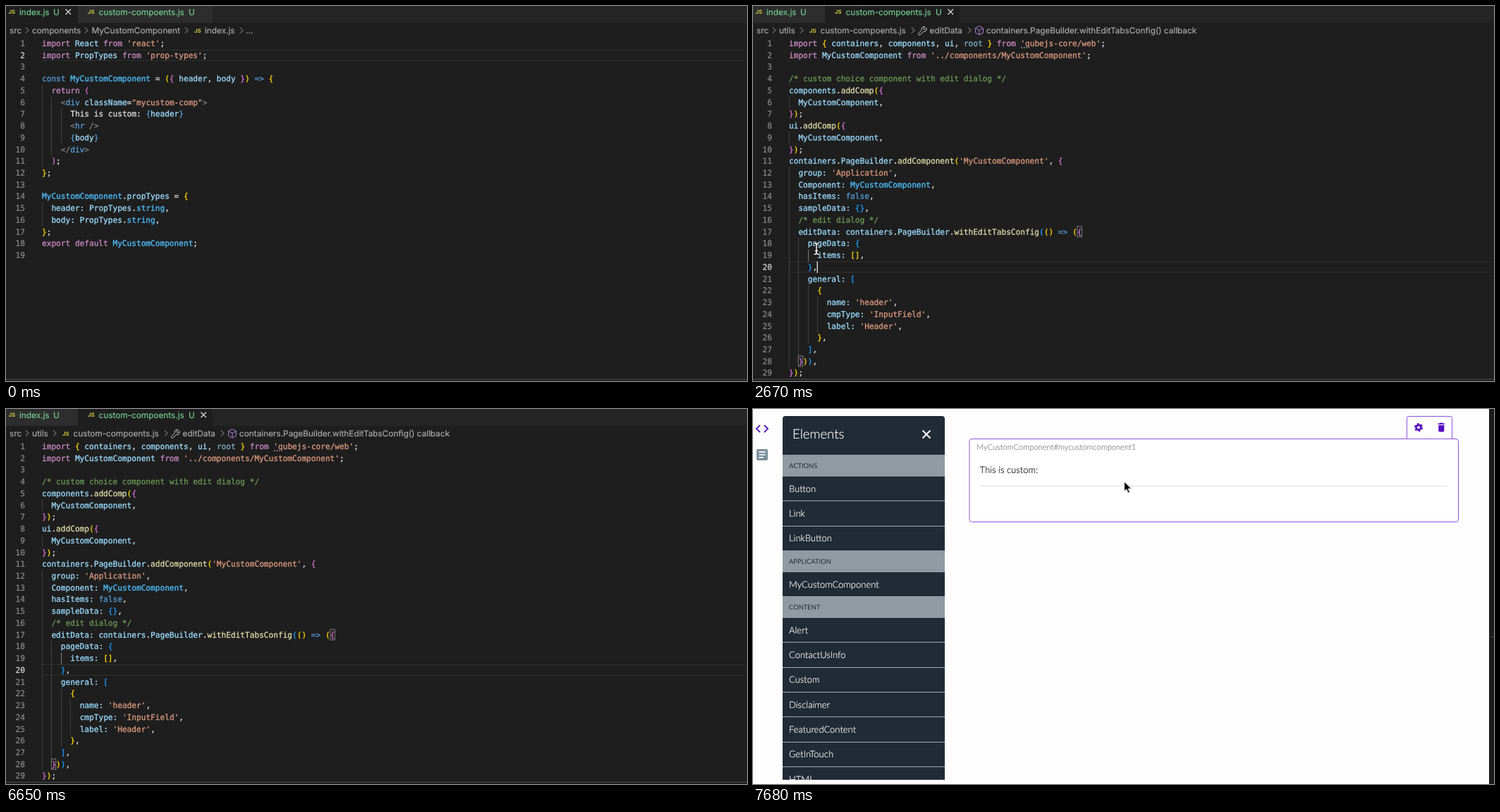
An HTML page that plays this animation: 1051 px wide and 533 px high, repeating every 8000 ms.

```html
<!DOCTYPE html>
<html lang="en">
<head>
<meta charset="utf-8">
<title>Custom component demo</title>
<style>
html, body { margin: 0; width: 100%; height: 100%; overflow: hidden; background: #1e1e1e; }
svg { display: block; width: 1051px; height: 533px; }
text, tspan { fill: currentColor; stroke: currentColor; }
text { text-rendering: geometricPrecision; stroke-width: .2; }
.code text { font: 11.14px "DejaVu Sans Mono", monospace; stroke-width: .3; color: #858585; }
.code .active { color: #d0d0d0; }
.ui text { font: 11.8px Inter, sans-serif; color: #a9a9a9; }
.ui .tab { color: #73c991; }
.ui .js { font-size: 7.8px; font-weight: 700; color: #cbcb41; stroke: none; }
.line { fill: none; stroke: #a9a9a9; }
.page text { font: 300 13px Lato, sans-serif; color: #fff; }
.page .head { font-size: 9.4px; font-weight: 400; color: #222b36; stroke: none; }
.page .title { font-size: 18.6px; }
.page .dark { color: #1c1c1c; }
.page .tag { font-size: 11.15px; color: #85858c; }

.anim { animation: 8s step-end infinite; }
#first { animation-name: first; }
#second { animation-name: second; }
#page { animation-name: page; }
#drag { animation-name: drag; }
#drop { animation-name: drop; }
#caret { animation-name: caret; }
#cursor { animation-name: move; }
#beam { animation-name: beam; }
#hand { animation-name: hand; }
#arrow { animation-name: page; }

@keyframes first { 0% { opacity: 1 } 18.625%, 100% { opacity: 0 } }
@keyframes second { 0% { opacity: 0 } 18.625% { opacity: 1 } 84.75%, 100% { opacity: 0 } }
@keyframes page { 0% { opacity: 0 } 84.75%, 100% { opacity: 1 } }
@keyframes drag { 0% { opacity: 1 } 86.625%, 100% { opacity: 0 } }
@keyframes drop { 0% { opacity: 0 } 86.625%, 100% { opacity: 1 } }
@keyframes caret {
  0%, 31.5%, 44.5%, 57.375%, 70.375%, 81.5% { opacity: 1 }
  26%, 38.875%, 51.875%, 62.875%, 76%, 83.125%, 100% { opacity: 0 }
}
@keyframes beam { 0%, 26% { opacity: 1 } 15%, 84.75%, 100% { opacity: 0 } }
@keyframes hand { 0%, 26%, 100% { opacity: 0 } 15% { opacity: 1 } }
@keyframes move {
  0%, 57.375% { transform: translate(-60px, -60px) }
  3.75% { transform: translate(377px, 494px) }
  5.625% { transform: translate(335px, 375px) }
  7.5% { transform: translate(268px, 190px) }
  9.375% { transform: translate(227px, 78px) }
  13.125% { transform: translate(212px, 46px) }
  15% { transform: translate(196px, 14px) }
  16.875%, 18.625%, 20.5% { transform: translate(192px, 11.5px) }
  24.125% { transform: translate(189px, 15px) }
  26% { transform: translate(158px, 80px) }
  27.875% { transform: translate(112px, 185px) }
  29.75% { transform: translate(84px, 265px) }
  31.5% { transform: translate(77px, 318px) }
  33.375% { transform: translate(90px, 345px) }
  35.25% { transform: translate(124px, 357px) }
  37.125% { transform: translate(166px, 362px) }
  38.875% { transform: translate(188px, 372px) }
  40.75% { transform: translate(199px, 380px) }
  48.25% { transform: translate(218px, 380.5px) }
  50% { transform: translate(296px, 405px) }
  51.875% { transform: translate(430px, 445px) }
  53.75% { transform: translate(580px, 488px) }
  55.625% { transform: translate(690px, 518px) }
  84.75% { transform: translate(498.5px, 86px) }
  90.375% { transform: translate(509px, 92px) }
  92.25% { transform: translate(523px, 101px) }
  94.125% { transform: translate(529.5px, 104.5px) }
  96%, 100% { transform: translate(526.5px, 103px) }
}
</style>
</head>
<body>
<svg viewBox="0 0 1051 533">
  <rect width="1051" height="533" fill="#1e1e1e"/>
  <g id="first" class="anim"></g>
  <g id="second" class="anim"></g>

  <g id="page" class="anim page">
    <rect width="1051" height="533" fill="#fdfdfd"/>
    <path fill="#1b1b1b" d="M1044 0h7v533h-7z"/>
    <path fill="#383838" d="M1044 323h7v1h-7z"/>
    <path fill="none" stroke="#5a1fc0" stroke-width="2" d="M10 23l-5 5 5 5M16 23l5 5-5 5"/>
    <rect x="5" y="57" width="16" height="16" rx="2" fill="#7d919c"/>
    <path stroke="#fff" stroke-width="1.7" d="M8.5 61.2h9M8.5 65h9M8.5 68.8h6"/>
    <path fill="#202b36" d="M42 527V14a4 4 0 0 1 4-4h222a4 4 0 0 1 4 4v513z"/>
    <text class="title" x="56" y="42">Elements</text>
    <path stroke="#fff" stroke-width="2" d="M240.5 30.5l11 11m0-11l-11 11"/>
    <clipPath id="panel"><path d="M42 10h230v517H42z"/></clipPath>
    <g id="list" clip-path="url(#panel)"></g>

    <g id="drag" class="anim">
      <rect x="307.5" y="43" width="692.5" height="80" rx="3.5" fill="#e8f0ea" stroke="#6cc66c" stroke-width="2"/>
      <path fill="none" stroke="#3d35a0" stroke-width="1.7" d="M643.5 73.5h20M653.5 63.5v20M650 66.5l3.5-3.5 3.5 3.5M650 80.5l3.5 3.5 3.5-3.5M646.5 70l-3.5 3.5 3.5 3.5M660.5 70l3.5 3.5-3.5 3.5"/>
      <text class="dark" x="588" y="100.5">Release to drop for root</text>
      <path fill="#038de0" d="M42 232h230v34H42z"/>
      <text x="51" y="254">MyCustomComponent</text>
      <g opacity=".9" style="filter: drop-shadow(0 3px 6px #0007)">
        <path fill="#202b36" d="M377.5 77h230.5v34.5h-230.5z"/>
        <text x="387" y="99.5">MyCustomComponent</text>
      </g>
    </g>

    <g id="drop" class="anim">
      <path fill="#fff" stroke="#8d55e0" d="M927.5 42.5v-30a2 2 0 0 1 2-2h60a2 2 0 0 1 2 2v30z"/>
      <rect x="307" y="42.5" width="693.5" height="118" rx="3.5" fill="#fff" stroke="#8d55e0"/>
      <g fill="none" stroke="#560cc0">
        <circle cx="944" cy="26.2" r="3.4" stroke-width="2.7"/>
        <circle cx="944" cy="26.2" r="5.2" stroke-width="1.8" stroke-dasharray="2.7 2.745"/>
      </g>
      <path fill="#560cc0" d="M971.5 20.5h2.5l1-1h2.5l1 1h2.5v1.5h-9.5zM972.3 23h8v8a1.4 1.4 0 0 1-1.4 1.4h-5.2a1.4 1.4 0 0 1-1.4-1.4z"/>
      <text class="tag" x="317" y="57.5">MyCustomComponent#mycustomcomponent1</text>
      <text class="dark" x="321.5" y="91">This is custom:</text>
      <path stroke="#dedede" d="M321.5 109.5h664"/>
    </g>
  </g>

  <g id="cursor" class="anim">
    <g id="beam" class="anim" fill="none">
      <path id="bar" d="M-3.5-8q3.5 0 3.5 2.5V5.5Q0 8-3.5 8M3.5-8Q0-8 0-5.5V5.5Q0 8 3.5 8M-2 3h4" stroke="#111" stroke-width="3.2"/>
      <path d="M-3.5-8q3.5 0 3.5 2.5V5.5Q0 8-3.5 8M3.5-8Q0-8 0-5.5V5.5Q0 8 3.5 8M-2 3h4" stroke="#fff" stroke-width="1.5"/>
    </g>
    <path id="hand" class="anim" fill="#fff" stroke="#111" stroke-width=".9" d="M-1.2 1.2q0-1.2 1.2-1.2t1.3 1.2l.6 3.6q2-1 2.5.6 1.7-.8 2.2.7 1.7-.4 1.7 1.2l-.3 3-1.5 2.8v1.4H.5L-1.5 11l-3-3.4q-.6-1.5 1-1.4L-.6 8z"/>
    <path id="arrow" class="anim" stroke="#fff" d="M0 0v14.2l3.2-3 2.3 5.3 2.5-1.1-2.3-5.1h4.6z"/>
  </g>
</svg>

<script>
const colors = {
  p: '#cb8ac6', v: '#9cdcfe', w: '#dedede', s: '#dc9a7f', b: '#569cd6', c: '#4fc1ff', y: '#ffd700',
  m: '#da70d6', u: '#179fff', f: '#dcdcaa', g: '#6a9955', d: '#808080', r: '#7badc6'
};
const rowH = 16.73, charW = 6.707, left = 51, top0 = 45;
const $ = id => document.getElementById(id);
const text = (x, y, s, cls = '') => `<text class="${cls}" x="${x}" y="${y}">${s}</text>`;
const rect = (x, y, w, h, fill) => `<rect x="${x}" y="${y}" width="${w}" height="${h}" fill="${fill}"/>`;
const rowTop = n => top0 + (n - 1) * rowH;
const cross = x => `<path class="line" style="stroke:#ddd;stroke-width:1.2" d="M${x} 4.5l7.5 7.5m0-7.5l-7.5 7.5"/>`;

// "~x" switches to colour x
function codeLine(src, n) {
  const [indent, ...parts] = src.split('~');
  const spans = parts.map(p =>
    `<tspan color="${colors[p[0]]}">${p.slice(1).replace(/</g, '&lt;')}</tspan>`).join('');
  return text(left + indent.length * charW, rowTop(n) + 12, spans);
}

function code(src, active, guides) {
  const y = Math.round(rowTop(active));
  let out = [y, y + 15].map(edge => rect(left, edge, 997, 1, '#303030')).join('');
  for (const [level, from, to, color = '#404040'] of guides)
    out += rect(Math.round(left + level * 2 * charW), rowTop(from), 1, (to - from + 1) * rowH, color);
  src.split('\n').forEach((line, i) => {
    const n = i + 1;
    out += `<text class="${n === active ? 'active' : ''}" x="27" y="${rowTop(n) + 12}" text-anchor="end">${n}</text>`;
    out += codeLine(line, n);
  });
  return `<g class="code">${out}</g>`;
}

function chrome(activeTab, crumbs, chevrons) {
  const tabs = [[0, 102], [102, 191]];
  const fill = i => i === activeTab ? '#1e1e1e' : '#2d2d2d';
  return '<g class="ui">' + rect(0, 0, 1051, 24, '#252526') +
    tabs.map(([x, w], i) => rect(x, 0, w, 24, fill(i))).join('') +
    text(3.5, 11, 'JS', 'js') + text(19, 12.5, 'index.js', 'tab') + text(67, 12.5, 'U', 'tab') +
    text(116, 11, 'JS', 'js') + text(131.5, 12.5, 'custom-compoents.js', 'tab') + text(259, 12.5, 'U', 'tab') +
    cross(activeTab ? 276.5 : 84.5) +
    crumbs.map(([x, s]) => s === 'JS' ? text(x, 37.5, s, 'js') : text(x, 39, s)).join('') +
    chevrons.map(x => `<path class="line" d="M${x} 30.5l4 4-4 4"/>`).join('') +
    rect(0, 530, 1051, 1, '#4c4c4c') + '</g>';
}

$('first').innerHTML = chrome(0,
  [[5, 'src'], [37, 'components'], [121.5, 'MyCustomComponent'], [267, 'JS'], [282, 'index.js'], [340, '...']],
  [28, 112, 254, 332]) +
code(`~pimport ~vReact ~pfrom ~s'react'~w;
~pimport ~vPropTypes ~pfrom ~s'prop-types'~w;

~bconst ~cMyCustomComponent ~w= ~y(~m{ ~vheader~w, ~vbody ~m}~y) ~b=> ~y{
  ~preturn ~m(
    ~d<~bdiv ~vclassName~w=~s"mycustom-comp"~d>
      ~wThis is custom: ~b{~vheader~b}
      ~d<~bhr ~d/>
      ~b{~vbody~b}
    ~d</~bdiv~d>
  ~m)~w;
~y}~w;

~cMyCustomComponent~w.~vpropTypes ~w= ~y{
  ~vheader: PropTypes~w.~cstring~w,
  ~vbody: PropTypes~w.~cstring~w,
~y}~w;
~pexport default ~cMyCustomComponent~w;
`, 2, [[0, 5, 11], [1, 6, 10], [2, 7, 9], [0, 15, 16]]);

const bracket = (col, n) =>
  `<rect x="${left + col * charW - .2}" y="${rowTop(n) + .5}" width="6.5" height="15" fill="none" stroke="#888" stroke-width=".9"/>`;

$('second').innerHTML = chrome(1,
  [[5, 'src'], [37, 'utils'], [80, 'JS'], [95.5, 'custom-compoents.js'], [250.5, 'editData'],
    [331, 'containers.PageBuilder.withEditTabsConfig() callback']],
  [28, 67, 225, 305]) +
`<path class="line" style="stroke:#ccc" d="M246 31.5l-2.5 2.5-2-2 2.5-2.5a3.8 3.8 0 0 0-4.8 4.8L235 38.5a1.6 1.6 0 0 0 2.3 2.3l4.2-4.3a3.8 3.8 0 0 0 4.5-5z"/>
<path class="line" style="stroke:#b180d7" d="M321 28.5l5.5 3v6.5l-5.5 3-5.5-3v-6.5zM315.5 31.5l5.5 3 5.5-3M321 34.5V41"/>` +
code(`~pimport ~y{ ~vcontainers~w, ~vcomponents~w, ~vui~w, ~rroot ~y} ~pfrom ~s'qubejs-core/web'~w;
~pimport ~vMyCustomComponent ~pfrom ~s'../components/MyCustomComponent'~w;

~g/* custom choice component with edit dialog */
~vcomponents~w.~faddComp~y(~m{
  ~vMyCustomComponent~w,
~m}~y)~w;
~vui~w.~faddComp~y(~m{
  ~vMyCustomComponent~w,
~m}~y)~w;
~vcontainers~w.~vPageBuilder~w.~faddComponent~y(~s'MyCustomComponent'~w, ~m{
  ~vgroup: ~s'Application'~w,
  ~vComponent: ~cMyCustomComponent~w,
  ~vhasItems: ~bfalse~w,
  ~vsampleData: ~u{}~w,
  ~g/* edit dialog */
  ~veditData: containers~w.~vPageBuilder~w.~fwithEditTabsConfig~u(~y() ~b=> ~y(~m{
    ~vpageData: ~u{
      ~vitems: ~y[]~w,
    ~u}~w,
    ~vgeneral: ~u[
      ~y{
        ~vname: ~s'header'~w,
        ~vcmpType: ~s'InputField'~w,
        ~vlabel: ~s'Header'~w,
      ~y}~w,
    ~u]~w,
  ~m}~y)~u)~w,
~m}~y)~w;`, 20, [[0, 6, 6], [0, 9, 9], [0, 12, 28], [1, 18, 27], [2, 19, 19, '#808080'], [2, 22, 26], [3, 23, 25]]) +
  bracket(61, 17) + bracket(2, 28) +
  [380.5, 384, 387.5].map(x => rect(x, 58.5, 1.4, 1.4, '#ccc')).join('') +
  '<rect id="caret" class="anim" x="90.5" y="363" width="1.5" height="16.5" fill="#d0d0d0"/>';

const item = (s, i, y0) => {
  const y = y0 + i * 35.35;
  return (i ? rect(42, Math.round(y) - 1, 230, 1, '#a3abb1') : '') + text(51, y + 21.7, s);
};
const section = (name, y, items) =>
  rect(42, y, 230, 31, '#909aa2') + text(51, y + 18.7, name, 'head') +
  items.map((s, i) => item(s, i, y + 31)).join('');

$('list').innerHTML =
  section('ACTIONS', 65, ['Button', 'Link', 'LinkButton']) +
  section('APPLICATION', 201, ['MyCustomComponent']) +
  section('CONTENT', 266, ['Alert', 'ContactUsInfo', 'Custom', 'Disclaimer', 'FeaturedContent', 'GetInTouch', 'HTML']);
</script>
</body>
</html>
```
